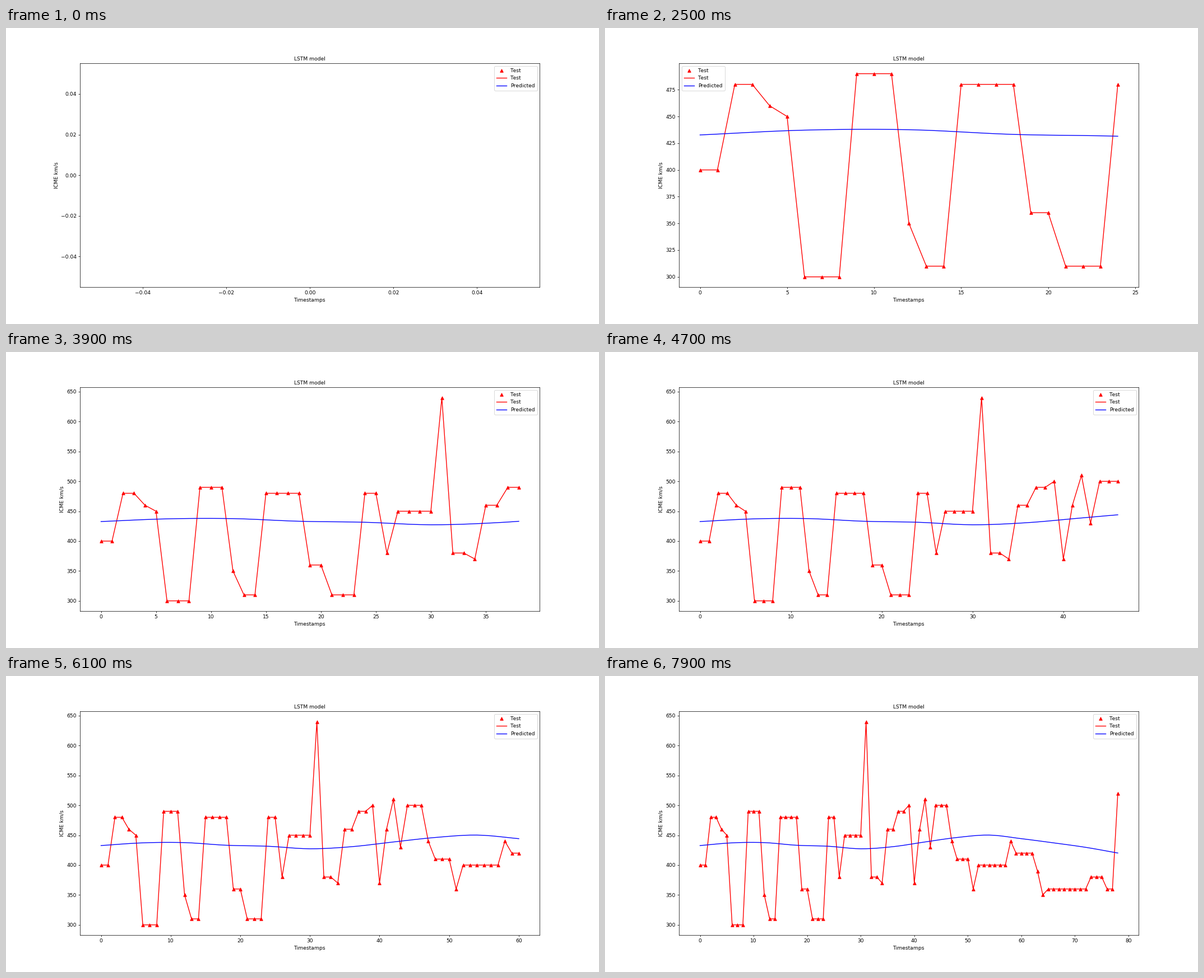
Animation of 1058 by 529 pixels, one loop 8 s. Source, as a matplotlib script:

```python
import numpy as np
import matplotlib.pyplot as plt
from matplotlib.animation import FuncAnimation

plt.rcParams.update({
    "font.family": "DejaVu Sans",
    "font.size": 10,
    "text.kerning_factor": 6,
    "figure.subplot.bottom": 0.125,
    "figure.subplot.top": 0.88,
    "figure.subplot.left": 0.125,
    "figure.subplot.right": 0.9,
})

FRAMES = 80

# Speeds that hold for some steps, then jump
test = np.array(
    [400] * 2 + [480] * 2 + [460, 450] + [300] * 3 + [490] * 3 + [350]
    + [310] * 2 + [480] * 4 + [360] * 2 + [310] * 3 + [480] * 2 + [380]
    + [450] * 4 + [640] + [380] * 2 + [370] + [460] * 2 + [490] * 2
    + [500, 370, 460, 510, 430] + [500] * 3 + [440] + [410] * 3 + [360]
    + [400] * 6 + [440] + [420] * 4 + [390, 350] + [360] * 8 + [380] * 3
    + [360] * 2 + [520])
steps = np.arange(len(test))

# Heights of the prediction at evenly spaced steps
KNOTS = np.array([432.7, 437.2, 437.6, 433.2, 431.5, 427.3, 430.8,
                  438.7, 446.2, 450.2, 444.2, 437.2, 429.7, 420.2])


def smooth(knots, count):
    """Cubic Hermite curve through evenly spaced heights."""
    slope = np.gradient(knots)
    u = np.linspace(0, len(knots) - 1, count)
    i = np.minimum(u.astype(int), len(knots) - 2)
    t = u - i
    return ((1 + 2 * t) * (1 - t) ** 2 * knots[i]
            + t * (1 - t) ** 2 * slope[i]
            + t * t * (3 - 2 * t) * knots[i + 1]
            + t * t * (t - 1) * slope[i + 1])


predicted = smooth(KNOTS, len(test))

fig, ax = plt.subplots(figsize=(16, 8), dpi=1058 / 16)


def draw(n):
    ax.clear()
    x = steps[:n]
    ax.scatter(x, test[:n], s=36, c="r", marker="^", linewidths=1,
               label="Test")
    ax.plot(x, test[:n], "r-", label="Test")
    ax.plot(x, predicted[:n], "b-", label="Predicted")
    ax.set_title("LSTM model", fontsize=10)
    ax.set_xlabel("Timestamps")
    ax.set_ylabel("ICME km/s")
    ax.legend(loc="best", scatteryoffsets=[0.5])


anim = FuncAnimation(fig, draw, frames=FRAMES, interval=100,
                     repeat=True, repeat_delay=0)
plt.show()
```
